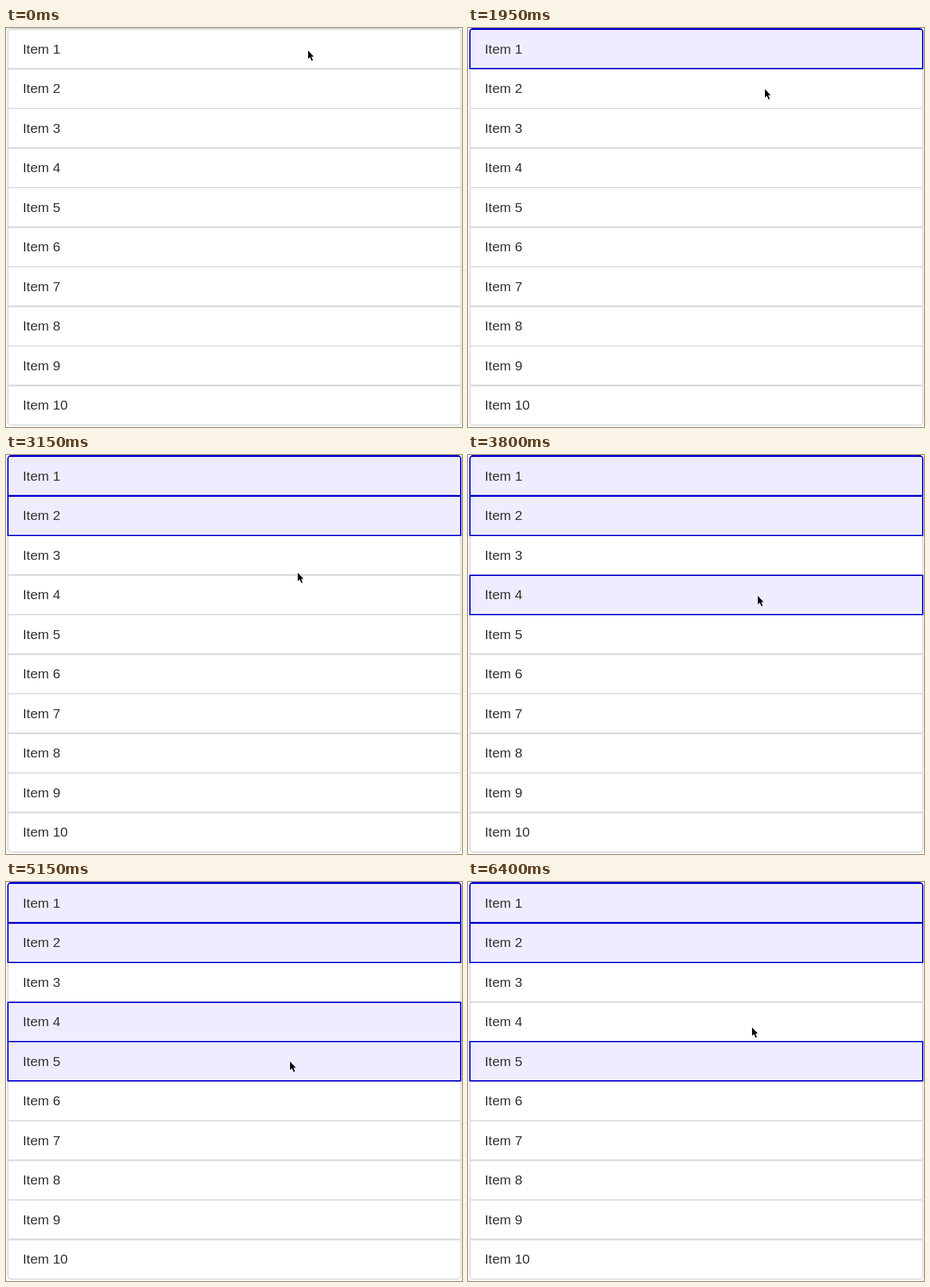
These frames come from a looping animation (708 px wide and 620 px high, 7.1 s). An HTML page:

```html
<!DOCTYPE html>
<html lang="en">
<head>
<meta charset="utf-8">
<title>Selectable list</title>
<style>
html, body { margin: 0; width: 100%; height: 100%; overflow: hidden; background: #fff; }
svg { display: block; }
text { font: 21px "Liberation Sans", Arial, sans-serif; fill: #333; }
.row { fill: #fff; stroke: #ddd; stroke-width: 2; }
.on { fill: #eeecfe; stroke: #0000cd; stroke-width: 2; visibility: hidden; }
</style>
</head>
<body>
<svg width="708" height="620" viewBox="0 0 708 620">
  <g id="rows"></g>
  <g id="marks"></g>
  <g id="labels"></g>
  <path id="cursor" d="M0 0V13L3 10.2L5.6 16L7.6 15.1L5.1 9.4H9Z"/>
</svg>
<script>
const LOOP = 7100, STEP = 50, COUNT = 10, PITCH = 61.5;

// Times at which a row is toggled
const clicks = [[1250, 0], [2300, 1], [3800, 3], [5100, 4], [6350, 3]];

// Pointer moves: start, end, destination
const home = [469, 35];
const moves = [
  [1550, 2000, 461, 97],
  [2700, 3400, 450, 219],
  [4250, 4800, 441, 279],
  [5600, 6000, 441, 226]
];

const byId = id => document.getElementById(id);

function add(parent, tag, attrs) {
  const el = document.createElementNS("http://www.w3.org/2000/svg", tag);
  for (const key in attrs) el.setAttribute(key, attrs[key]);
  return byId(parent).appendChild(el);
}

function boxPath(i) {
  const top = i ? Math.floor(1.5 + PITCH * i) + 1 : 1;
  const bottom = Math.floor(1.5 + PITCH * i) + 62;
  const a = i === 0 ? 5 : 0, b = i === COUNT - 1 ? 5 : 0;
  const arc = (r, x, y) => r ? `a${r} ${r} 0 0 1 ${x} ${y}` : "";
  const box = `M${3 + a} ${top}H${706 - a}${arc(a, a, a)}V${bottom - b}${arc(b, -b, b)}` +
    `H${3 + b}${arc(b, -b, -b)}V${top + a}${arc(a, a, -a)}Z`;
  return i ? box : box + "M5 2H704";
}

const marks = [];
for (let i = 0; i < COUNT; i++) {
  const d = boxPath(i);
  add("rows", "path", { class: "row", d });
  marks.push(add("marks", "path", { class: "on", d }));
  add("labels", "text", { x: 26, y: Math.floor(40 + PITCH * i) }).textContent = `Item ${i + 1}`;
}

const ease = p => p * p * (3 - 2 * p);

function pointerAt(t) {
  let [x, y] = home;
  for (const [start, end, toX, toY] of moves) {
    const p = ease(Math.min(1, Math.max(0, (t - start) / (end - start))));
    x += (toX - x) * p;
    y += (toY - y) * p;
  }
  return [Math.round(x), Math.round(y)];
}

function draw(time) {
  const t = Math.floor((time % LOOP) / STEP) * STEP;
  marks.forEach((mark, i) => {
    const hits = clicks.filter(([at, row]) => row === i && at <= t).length;
    mark.style.visibility = hits % 2 ? "visible" : "hidden";
  });
  byId("cursor").setAttribute("transform", `translate(${pointerAt(t)})`);
}

const begin = performance.now();
function tick() {
  draw(performance.now() - begin);
  requestAnimationFrame(tick);
}
tick();
</script>
</body>
</html>
```
